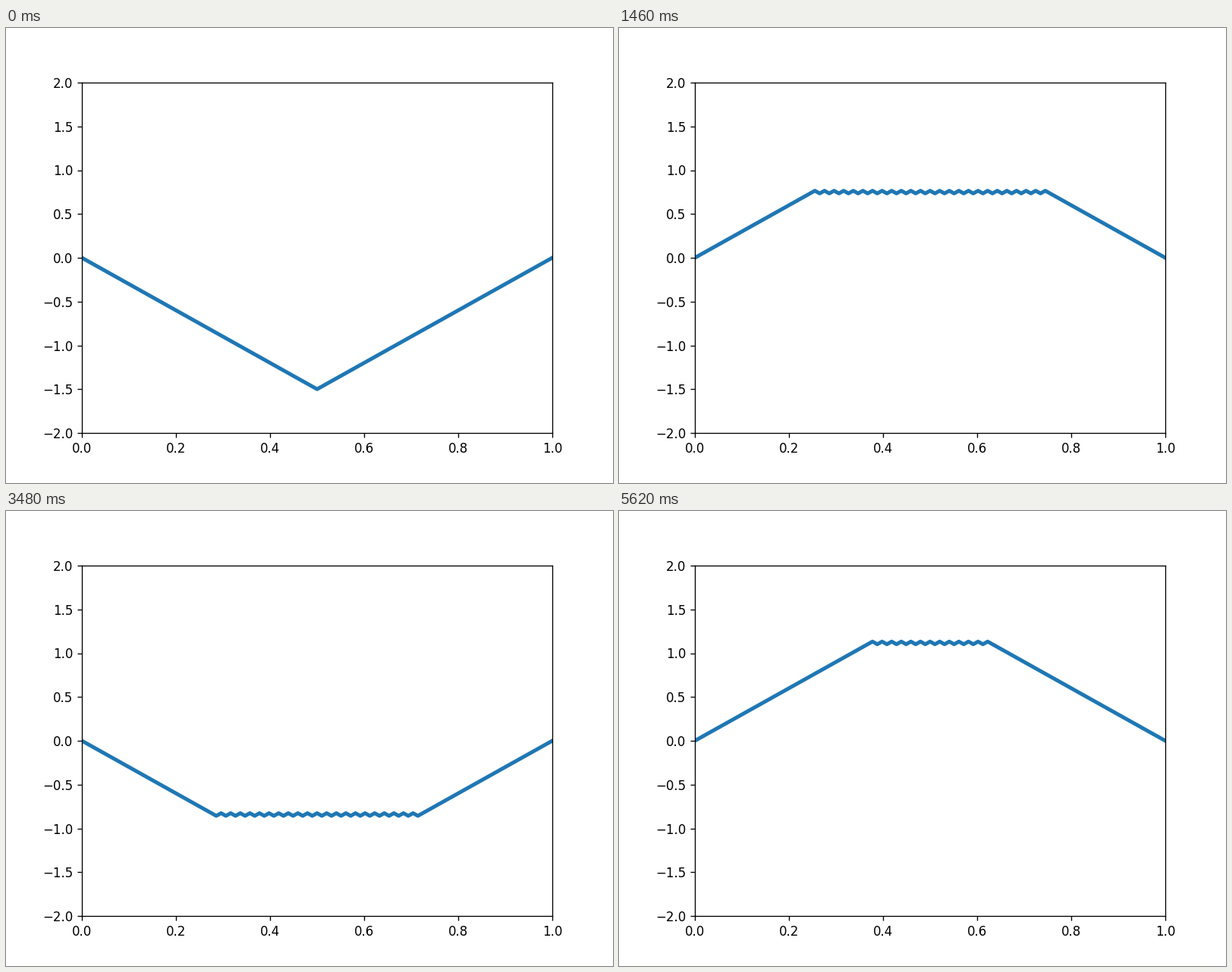
These frames come from a looping animation (800x600 px, 5640 ms). A matplotlib script:

```python
import matplotlib.pyplot as plt
import numpy as np
from matplotlib.animation import FuncAnimation

CELLS = 98
FRAMES = 282
INTERVAL = 20


def plucked_string(x, steps):
    """Leapfrog solution of the wave equation at unit Courant number, ends fixed."""
    u = np.zeros((steps, x.size))
    u[0] = 3 * np.abs(x - 0.5) - 1.5
    u[1] = u[0]  # released at rest
    for n in range(1, steps - 1):
        u[n + 1, 1:-1] = u[n, 2:] + u[n, :-2] - u[n - 1, 1:-1]
    return u[1:]


x = np.linspace(0, 1, CELLS + 1)
states = plucked_string(x, FRAMES + 1)

fig, ax = plt.subplots(figsize=(20 / 3, 5), dpi=120)
ax.set(xlim=(0, 1), ylim=(-2, 2))
line, = ax.plot(x, states[0], lw=3)


def update(i):
    line.set_ydata(states[i])
    return line,


anim = FuncAnimation(fig, update, frames=FRAMES, interval=INTERVAL,
                     repeat=True, repeat_delay=0)
plt.show()
```
